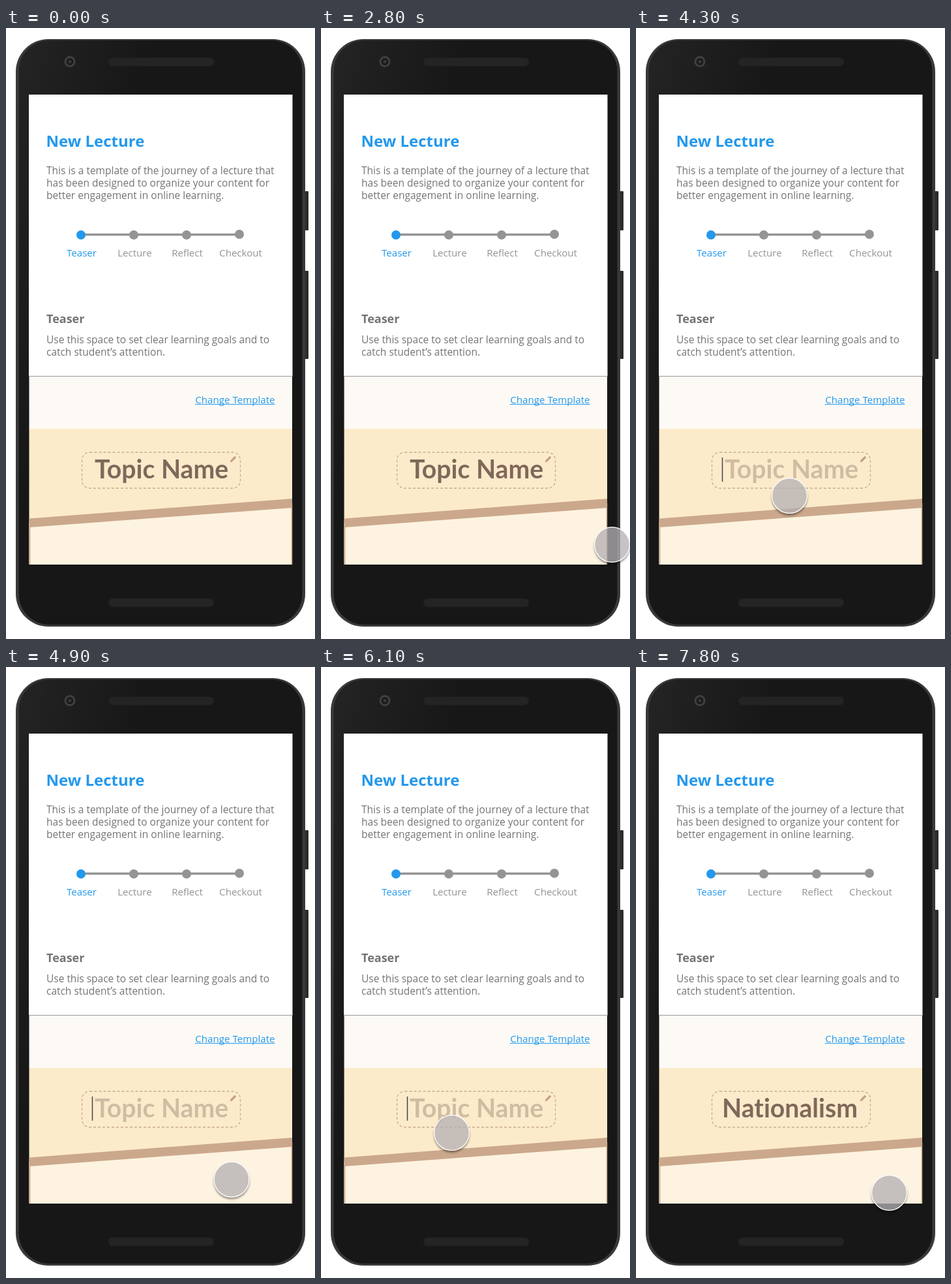
Write an HTML page that moves like this. It is 474 by 936 pixels and loops after 8000 ms.

```html
<!DOCTYPE html>
<html lang="en">
<head>
<meta charset="utf-8">
<title>New Lecture</title>
<style>
  html, body { margin: 0; width: 100%; height: 100%; overflow: hidden; background: #fff; }
  svg { display: block; width: 474px; height: 936px; font: 15.5px "Open Sans", "Noto Sans", sans-serif; fill: #747474; }
  .heading { font-weight: 700; }
  .blue { fill: #2398ec; }
  .steps { font-size: 15.1px; fill: #949494; text-anchor: middle; }
  .topic { font: 700 39.2px Lato, sans-serif; font-variant-ligatures: none; fill: #80685a; }
</style>
</head>
<body>
<svg viewBox="0 0 474 936">
  <defs>
    <linearGradient id="bodyShade" x2="0.35" y2="0.2">
      <stop stop-color="#242424"/><stop offset="1" stop-color="#171717"/>
    </linearGradient>
    <filter id="shadow" x="-30%" y="-30%" width="160%" height="160%"><feGaussianBlur stdDeviation="1.7"/></filter>
    <mask id="outsideDisc">
      <rect x="-45" y="-45" width="90" height="90" fill="#fff"/>
      <circle r="27.500" fill="#000"/>
    </mask>
  </defs>

  <!-- Phone -->
  <rect x="455" y="250" width="9" height="60" rx="1" fill="#2c2c2c"/>
  <rect x="455" y="372" width="9" height="135" rx="1" fill="#2c2c2c"/>
  <rect x="15" y="17" width="444" height="900" rx="50" fill="#393939"/>
  <rect x="19.500" y="19" width="435" height="895" rx="47" fill="url(#bodyShade)"/>
  <g fill="#242424" stroke="#1d1d1d">
    <rect x="157" y="45.500" width="162" height="13" rx="6.500"/>
    <rect x="157" y="874" width="162" height="13" rx="6.500"/>
  </g>
  <circle cx="98" cy="51.500" r="7" fill="#1b1b1b" stroke="#404040" stroke-width="3"/>
  <circle cx="98" cy="51.500" r="2.500" fill="#383838"/>

  <!-- Screen -->
  <rect x="35" y="102" width="404.500" height="432" fill="#fff"/>
  <text class="heading blue" x="61.500" y="182" font-size="24">New Lecture</text>
  <text x="62" y="224">This is a template of the journey of a lecture that</text>
  <text x="62" y="243">has been designed to organize your content for</text>
  <text x="62" y="262">better engagement in online learning.</text>

  <path d="M115 316.500H358" stroke="#949494" stroke-width="3.300"/>
  <g class="steps">
    <circle class="blue" cx="115" cy="317" r="7"/>
    <circle cx="196" cy="317" r="7"/>
    <circle cx="277" cy="317" r="7"/>
    <circle cx="358" cy="316" r="7"/>
    <text class="blue" x="116" y="350">Teaser</text>
    <text x="197.500" y="350">Lecture</text>
    <text x="278" y="350">Reflect</text>
    <text x="360" y="350">Checkout</text>
  </g>

  <text class="heading" x="62" y="452" font-size="18">Teaser</text>
  <text x="62" y="483">Use this space to set clear learning goals and to</text>
  <text x="62" y="502">catch student’s attention.</text>

  <rect x="35.500" y="534" width="403.500" height="80" fill="#fdfaf6"/>
  <path d="M35 533.500H439.500" stroke="#989898" stroke-width="1.200"/>
  <text class="blue" x="412.500" y="575" font-size="15.1" text-anchor="end">Change Template</text>
  <path d="M290 576.500H412.500" stroke="#2398ec"/>

  <rect x="35.500" y="614" width="403.500" height="208" fill="#fcebcb"/>
  <path d="M35.500 758L439 728V822H35.500Z" fill="#fdf3e0"/>
  <path d="M36.500 758V822M438.500 728V822" stroke="#cba88c" stroke-width="1.500"/>
  <path d="M35.500 751.500L439 721V735L35.500 765Z" fill="#cba88c"/>
  <rect x="116.500" y="650" width="243" height="55" rx="12" fill="none" stroke="#c9aa90" stroke-width="1.300" stroke-dasharray="4 3"/>
  <path d="M344 665l1-3 6-6 2 2-6 6z" fill="#c3a08a" stroke="#c3a08a" stroke-width=".7"/>

  <g class="topic">
    <text id="placeholder" x="136" y="690">Topic Name</text>
    <text id="typed" x="132" y="690">Nationalism</text>
  </g>
  <path id="caret" d="M132.500 658V695" stroke="#444" stroke-width="1.500"/>

  <g id="cursor">
    <circle cy="3" r="27.500" fill="#000" opacity=".38" filter="url(#shadow)" mask="url(#outsideDisc)"/>
    <circle r="27" fill="#b4b0b4" fill-opacity=".76"/>
    <circle r="26.900" fill="none" stroke="#fff" stroke-width="1.200"/>
  </g>
</svg>
<script>
  const LOOP = 8000, STEP = 100;
  const CURSOR_IN = 2800, FOCUS = 4300, FILL_START = 6800, FILL_END = 7100;

  // Pointer path: time, x, y
  const path = [
    [2800, 446.5, 791.5], [3000, 405, 795], [3300, 292, 752], [3500, 243, 720], [3600, 235.5, 716.5],
    [4300, 235.5, 716.5], [4600, 290, 758], [4900, 346, 785], [5100, 356, 788],
    [5400, 265.5, 741.5], [5800, 207, 704], [6100, 200.5, 713.5],
    [6300, 258, 738], [6600, 350, 780], [6900, 295, 794], [7100, 236.5, 810.5],
    [7400, 340, 818], [7600, 401, 814], [7800, 388.5, 805.5]
  ];
  const [placeholder, typed, caret, cursor] =
    ["placeholder", "typed", "caret", "cursor"].map(id => document.getElementById(id));

  const clamp = v => Math.max(0, Math.min(1, v));
  const mix = (a, b, k) => a + (b - a) * k;

  function pointerAt(t) {
    const next = path.findIndex(p => p[0] > t);
    if (next < 0) return path[path.length - 1].slice(1);
    const a = path[Math.max(0, next - 1)], b = path[next];
    const k = clamp((t - a[0]) / (b[0] - a[0]));
    return [mix(a[1], b[1], k), mix(a[2], b[2], k)];
  }

  function draw(now) {
    const t = Math.floor(now % LOOP / STEP) * STEP;
    const filled = clamp((t - FILL_START) / (FILL_END - FILL_START));
    const focused = t >= FOCUS;

    placeholder.setAttribute("opacity", focused ? 0.35 * (1 - filled) : 1);
    typed.setAttribute("opacity", filled);
    caret.setAttribute("opacity", focused ? 1 - filled : 0);
    cursor.setAttribute("visibility", t >= CURSOR_IN ? "visible" : "hidden");
    cursor.setAttribute("transform", `translate(${pointerAt(t)})`);
    requestAnimationFrame(loop);
  }

  const start = performance.now();
  const loop = () => draw(performance.now() - start);
  loop();
</script>
</body>
</html>
```
